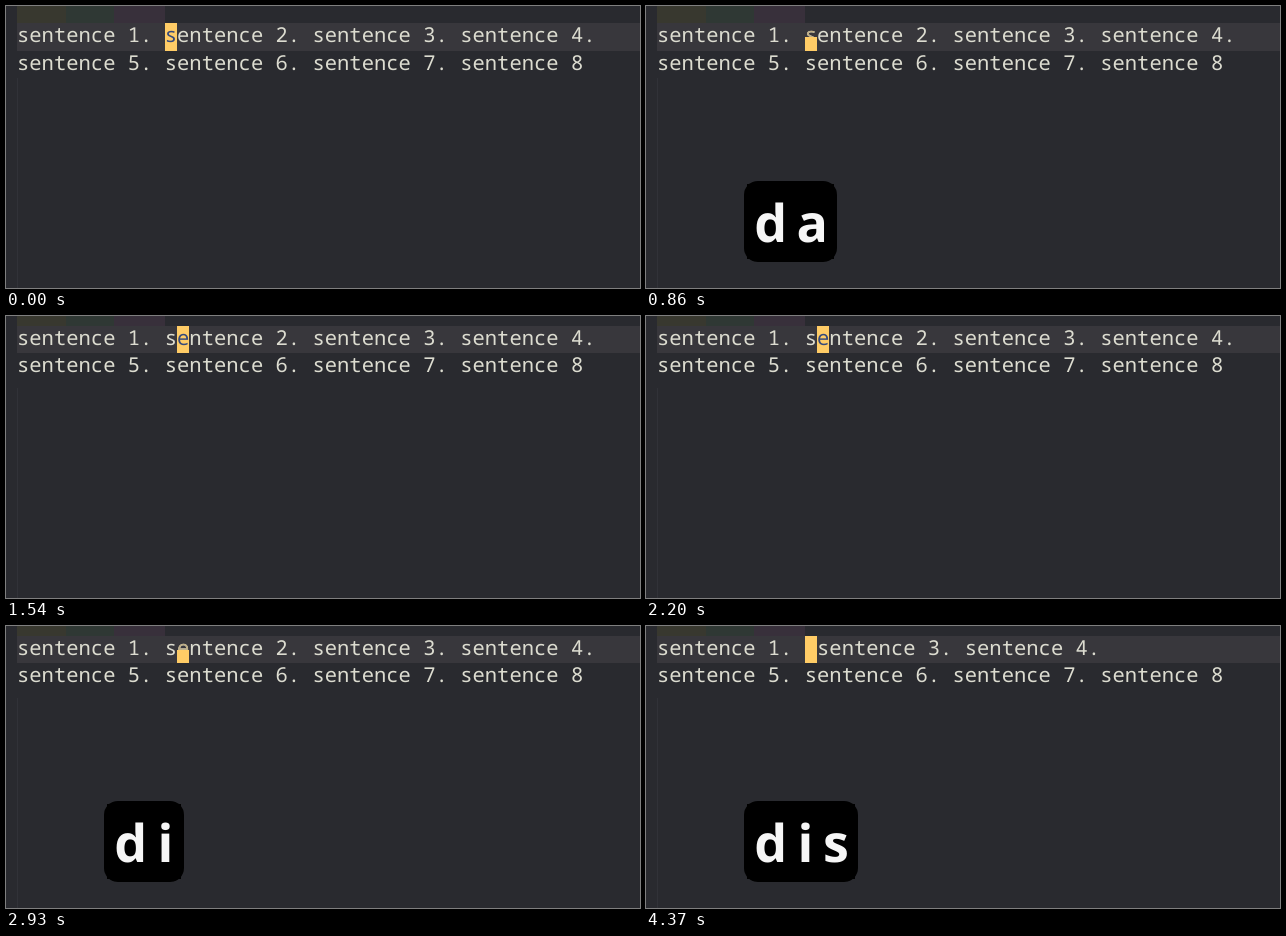
Recreate the animation shown at these times as an HTML page. Size 634 by 282 pixels, loop 4.84 s.

```html
<!DOCTYPE html>
<html lang="en">
<head>
<meta charset="utf-8">
<title>Sentence text objects</title>
<style>
  html, body { margin: 0; width: 100%; height: 100%; overflow: hidden; background: #292a2f; }
  svg { display: block; }
  text { white-space: pre; text-rendering: geometricPrecision; }
  .code { font: 20.52px "Noto Sans Mono", "DejaVu Sans Mono", monospace; fill: #dcdcd0; }
  .key { font: bold 52px "Noto Sans", "Open Sans", sans-serif; fill: #f6f6f6; text-anchor: middle; }
</style>
</head>
<body>
<svg id="stage" width="634" height="282" viewBox="0 0 634 282"></svg>
<script>
const LOOP = 4840;
const LEFT = 11;
const CHAR = 12.312;
const FULL = "sentence 1. sentence 2. sentence 3. sentence 4.";
const AROUND = "sentence 1. sentence 3. sentence 4.";
const INNER = "sentence 1.  sentence 3. sentence 4.";
const SECOND = "sentence 5. sentence 6. sentence 7. sentence 8";

// Editor views: top and bottom of the current line, and baseline of the next
const LOW = { top: 17, bottom: 45, next: 64 };
const HIGH = { top: 10, bottom: 37, next: 56 };

// Key overlay: right edge of the box, then the centre of each letter
const KEYS = {
  "d": [151, 124.8],
  "da": [191, 124.8, 166.3],
  "das": [225, 124.8, 166.3, 203],
  "di": [178, 124.8, 159.5],
  "dis": [212, 124.8, 159.5, 190]
};

// time, view, first line, cursor column, cursor shape, keys
const STEPS = [
  [0, LOW, FULL, 12, "block", ""],
  [330, LOW, FULL, 12, "off", ""],
  [730, LOW, FULL, 12, "off", "d"],
  [790, LOW, FULL, 12, "half", "d"],
  [860, LOW, FULL, 12, "half", "da"],
  [990, LOW, FULL, 12, "half", "das"],
  [1060, LOW, AROUND, 11, "block", "das"],
  [1540, HIGH, FULL, 13, "block", ""],
  [1740, HIGH, FULL, 13, "off", ""],
  [2200, HIGH, FULL, 13, "block", ""],
  [2730, HIGH, FULL, 13, "off", ""],
  [2870, HIGH, FULL, 13, "off", "d"],
  [2930, HIGH, FULL, 13, "half", "di"],
  [3310, HIGH, FULL, 13, "half", "dis"],
  [3380, HIGH, INNER, 12, "block", "dis"],
  [3840, HIGH, INNER, 12, "off", "dis"],
  [4370, HIGH, INNER, 12, "block", "dis"]
];

const box = (x1, y1, x2, y2, fill, r = 0) =>
  `<rect x="${x1}" y="${y1}" width="${x2 - x1}" height="${y2 - y1}" rx="${r}" fill="${fill}"/>`;
const code = (x, y, str, style = "") =>
  `<text class="code" x="${x}" y="${y}" style="${style}">${str}</text>`;

function cursor(view, line, col, shape) {
  if (shape === "off") return "";
  const x = LEFT + col * CHAR;
  const glyph = fill => code(x, view.top + 19, line[col], `fill:${fill}`);
  const block = top => box(Math.round(x), top, Math.round(x + CHAR), view.bottom, "#ffcc66");
  return shape === "block"
    ? block(view.top) + glyph("#35497c")
    : glyph("#bfae86") + block(view.top + 14);
}

function overlay(keys) {
  if (!keys) return "";
  const [right, ...centres] = KEYS[keys];
  const letters = centres.map((x, i) => `<text class="key" x="${x}" y="236">${keys[i]}</text>`);
  return box(98, 175, right, 256, "#000", 14) +
    box(101, 178, right - 3, 253, "#000") + letters.join("");
}

function draw([, view, line, col, shape, keys]) {
  return box(0, 0, 634, 282, "#292a2f") +
    box(11, 0, 60, 17, "#38382f") +
    box(60, 0, 108, 17, "#2f3834") +
    box(108, 0, 159, 17, "#38303b") +
    box(11, 72, 12, 282, "#313238") +
    box(11, view.top, 634, view.bottom, "#38373c") +
    code(LEFT, view.top + 19, line) +
    code(LEFT, view.next, SECOND) +
    cursor(view, line, col, shape) +
    overlay(keys);
}

const stage = document.getElementById("stage");
const start = performance.now();
let shown = null;

function tick() {
  const t = (performance.now() - start) % LOOP;
  const step = STEPS.findLast(s => s[0] <= t);
  if (step !== shown) {
    stage.innerHTML = draw(step);
    shown = step;
  }
  requestAnimationFrame(tick);
}
tick();
</script>
</body>
</html>
```
